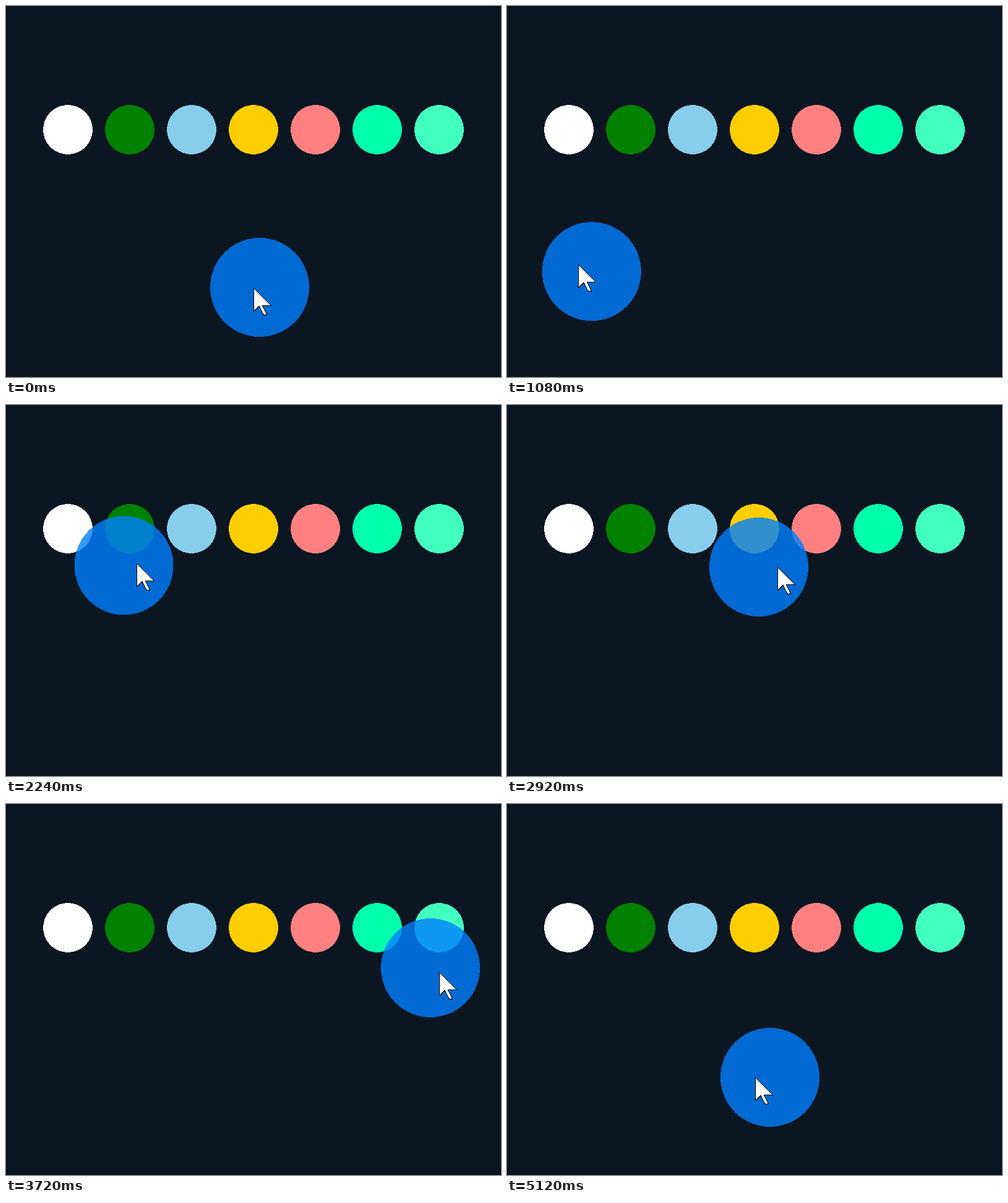
An HTML page that plays this animation: 800x600 px, repeating every 5160 ms.

```html
<!DOCTYPE html>
<html lang="en">
<head>
<meta charset="utf-8">
<title>Follow the pointer</title>
<style>
  html, body { margin: 0; width: 100%; height: 100%; overflow: hidden; background: #0c1621; }
  svg { display: block; width: 800px; height: 600px; shape-rendering: crispEdges; }
</style>
</head>
<body>
<svg viewBox="0 0 800 600">
  <g id="dots"></g>
  <circle id="ball" r="80" fill="#0080ff" fill-opacity=".8"/>
  <path id="pointer" d="M.5 .5V38L9 29.5 16.5 43.5H21.5L14.5 28.5H28.5Z" fill="#fff" stroke="#000" stroke-linejoin="round"/>
</svg>
<script>
const LOOP = 5160, STEP = 40;
const LAG = 80; // ms the ball trails the pointer
const COLORS = ['#fff', '#008200', '#87ceeb', '#ffce00', '#ff8080', '#00ffaa', '#42ffbf'];

// Key points of the ball's path: [time, x, y]
const PATH = [
  [0, 410, 455], [560, 310.5, 462], [640, 286, 462], [1120, 126.5, 423.5],
  [1560, 57, 328], [2240, 190.5, 259.5], [2920, 407, 262], [3360, 590, 257.3],
  [3720, 686, 265], [3920, 709.5, 290], [4360, 698, 419], [5040, 448.5, 442],
  [5120, 425, 442]
];
const LAST = PATH.length - 1;

const span = i => PATH[i + 1][0] - PATH[i][0];
const slope = (i, axis) => (PATH[i + 1][axis] - PATH[i][axis]) / span(i);

function tangent(i, axis) {
  if (i === 0) return 1.5 * slope(0, axis) - 0.5 * tangent(1, axis);
  if (i === LAST) return slope(LAST - 1, axis);
  const before = span(i - 1), after = span(i);
  return (slope(i - 1, axis) * after + slope(i, axis) * before) / (before + after);
}

// Cubic Hermite curve through the key points
function ballAt(t) {
  let i = 0;
  while (i < LAST - 1 && t >= PATH[i + 1][0]) i++;
  const h = span(i), u = (t - PATH[i][0]) / h, v = 1 - u;
  return [1, 2].map(axis =>
    v * v * (1 + 2 * u) * PATH[i][axis] + u * u * (3 - 2 * u) * PATH[i + 1][axis] +
    h * u * v * (v * tangent(i, axis) - u * tangent(i + 1, axis)));
}

// The pointer leads the ball in proportion to the ball's velocity
function pointerAt(t) {
  const [now, prev, next] = [t, t - 1, t + 1].map(ballAt);
  return now.map((p, axis) => Math.round(p + LAG * (next[axis] - prev[axis]) / 2));
}

const find = id => document.getElementById(id);
const move = (el, [x, y]) => el.setAttribute('transform', `translate(${x} ${y})`);

find('dots').innerHTML = COLORS.map((c, i) =>
  `<circle cx="${100 + i * 100}" cy="200" r="40" fill="${c}"/>`).join('');
const ball = find('ball'), pointer = find('pointer');

function draw(now) {
  const t = Math.floor((now % LOOP) / STEP) * STEP;
  move(ball, ballAt(t));
  move(pointer, pointerAt(t));
}

const start = performance.now();
function tick() {
  draw(performance.now() - start);
  requestAnimationFrame(tick);
}
tick();
</script>
</body>
</html>
```
